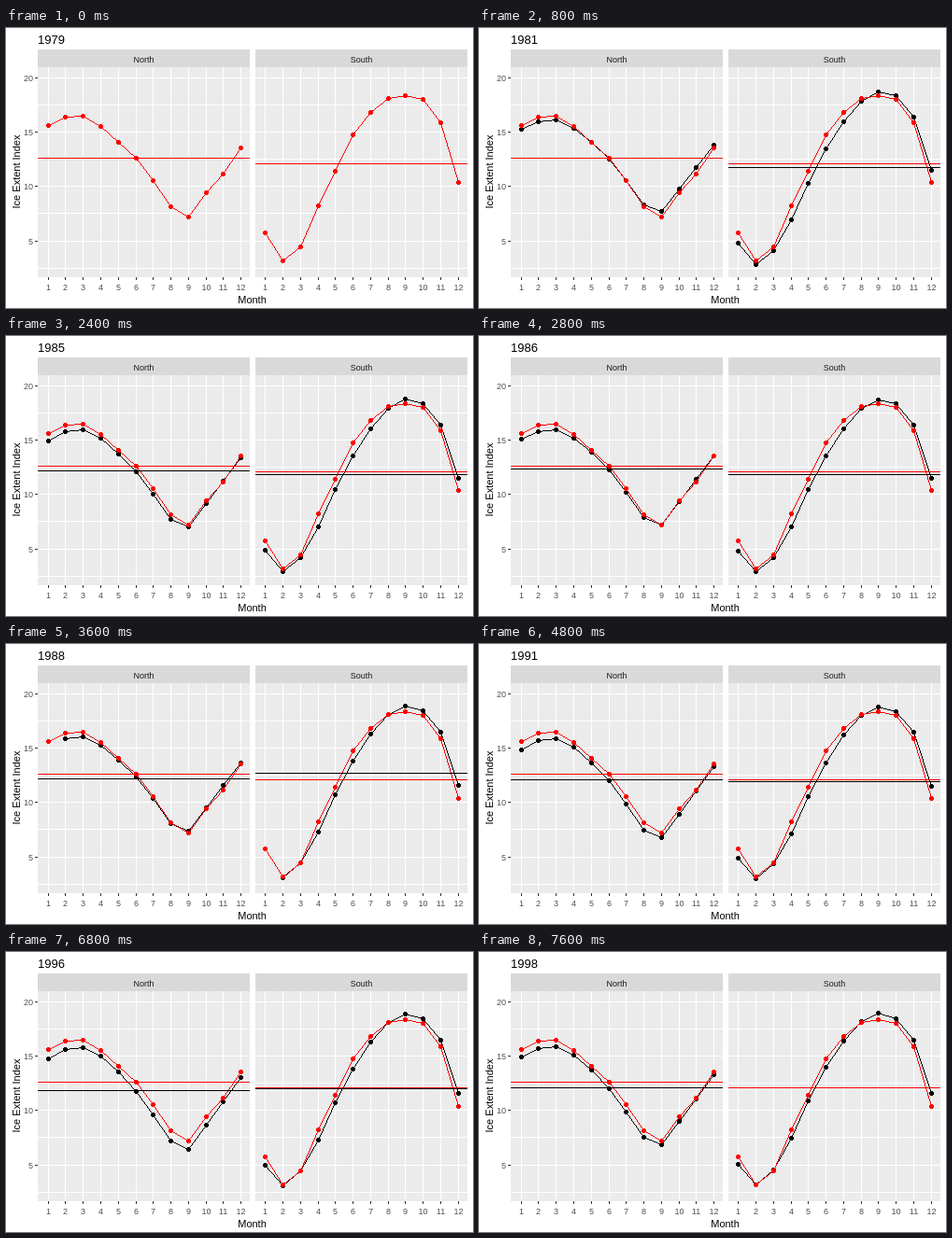
Write an HTML page with a canvas that moves like this. It is 500x300 px and loops after 8 s.

```html
<!DOCTYPE html>
<html lang="en">
<head>
<meta charset="utf-8">
<title>Ice Extent Index</title>
<style>
  html, body { margin: 0; width: 100%; height: 100%; overflow: hidden; background: #fff; }
  canvas { display: block; }
</style>
</head>
<body>
<canvas id="chart" width="500" height="300"></canvas>
<script>
const ctx = document.getElementById('chart').getContext('2d');
const FIRST = 1979, YEARS = 20, STEP = 400;
const TOP = 42, BOTTOM = 267, WIDTH = 227;
const RED = '#f00', BLACK = '#000', TICK = '#333', LABEL = '#4d4d4d';

// Seasonal curves as plot heights: the first year, and a usual later year.
// drift(t) shifts year t; the shift is strongest around month index `peak`.
const panels = [
  {
    name: 'North', left: 34.4, peak: 8,
    first: [104, 95, 94, 105, 122, 139, 163, 191, 202, 176, 156, 128],
    usual: [111, 102, 100, 109, 125, 144, 168, 195, 203, 178, 154, 129],
    drift: t => 0.35 * t - 3.4 + 2.2 * Math.sin(1.1 * (t - 4.2))
  },
  {
    name: 'South', left: 267, peak: 4,
    first: [219, 249, 234, 190, 153, 114, 90, 75, 72, 76, 101, 165],
    usual: [228, 250, 234, 201, 161, 125, 96, 75, 66, 71, 94, 151],
    drift: t => 2.6 - 0.2 * t + Math.cos(1.142 * (t - 1.3))
  }
];

const monthX = (panel, m) => Math.round(panel.left + 10.31 + 18.76 * m);
const valueY = v => Math.floor(286.35 - 11.66 * v);

// Two consecutive months, counted from the start, have no reading.
const isGap = (t, m) => t * 12 + m === 107 || t * 12 + m === 108;

function series({ usual, drift, peak }, t) {
  return usual.map((y, m) => {
    const weight = 1 + 0.6 * Math.cos((m - peak) * Math.PI / 6);
    return isGap(t, m) ? null : Math.round(y + drift(t) * weight);
  });
}

function mean(list) {
  const known = list.filter(y => y !== null);
  return known.reduce((a, b) => a + b, 0) / known.length;
}

function rect(x, y, w, h, color) {
  ctx.fillStyle = color;
  ctx.fillRect(x, y, w, h);
}

function text(str, x, y, size, color, align = 'center') {
  ctx.font = size + 'px "Liberation Sans", Arial, sans-serif';
  ctx.fillStyle = color;
  ctx.textAlign = align;
  ctx.fillText(str, x, y);
}

// Hard-edged line, one pixel wide.
function line(x0, y0, x1, y1, color) {
  const n = Math.max(Math.abs(x1 - x0), Math.abs(y1 - y0));
  for (let i = 0; i <= n; i++) {
    rect(Math.round(x0 + (x1 - x0) * i / n), Math.round(y0 + (y1 - y0) * i / n), 1, 1, color);
  }
}

function dot(x, y, color) {
  rect(x - 2, y - 1, 5, 3, color);
  rect(x - 1, y - 2, 3, 5, color);
}

function curve(panel, data, color) {
  data.forEach((y, m) => {
    if (y === null) return;
    const x = monthX(panel, m);
    if (m > 0 && data[m - 1] !== null) line(monthX(panel, m - 1), data[m - 1], x, y, color);
    dot(x, y, color);
  });
}

function drawPanel(panel, t) {
  const left = Math.round(panel.left);
  rect(left, 23, WIDTH, TOP - 23, '#d9d9d9');
  rect(left, TOP, WIDTH, BOTTOM - TOP, '#ebebeb');
  text(panel.name, left + WIDTH / 2, 37, 9, '#1a1a1a');
  for (let v = 2.5; v <= 20; v += 2.5) rect(left, valueY(v), WIDTH, 1, '#fff');
  for (let m = 0; m < 12; m++) {
    const x = monthX(panel, m);
    rect(x, TOP, 1, BOTTOM - TOP, '#fff');
    rect(x, BOTTOM, 1, 3, TICK);
    text(m + 1, x + 0.5, 281, 9, LABEL);
  }
  const layers = [[panel.first, RED]];
  if (t > 0) layers.unshift([series(panel, t), BLACK]);
  layers.forEach(([data, color]) => curve(panel, data, color));
  layers.forEach(([data, color]) => rect(left, Math.round(mean(data) - 0.2), WIDTH, 1, color));
}

function draw(t) {
  rect(0, 0, 500, 300, '#fff');
  text(FIRST + t, 34, 17, 13, BLACK, 'left');
  panels.forEach(p => drawPanel(p, t));
  for (let v = 5; v <= 20; v += 5) {
    rect(31, valueY(v), 3, 1, TICK);
    text(v, 29, valueY(v) + 4, 9, LABEL, 'right');
  }
  text('Month', 263.5, 295, 11, BLACK);
  ctx.save();
  ctx.translate(15, 154);
  ctx.rotate(-Math.PI / 2);
  text('Ice Extent Index', 0, 0, 11, BLACK);
  ctx.restore();
}

const t0 = performance.now();
function tick() {
  const elapsed = Math.max(0, performance.now() - t0);
  draw(Math.floor(elapsed / STEP) % YEARS);
  requestAnimationFrame(tick);
}
tick();
</script>
</body>
</html>
```
